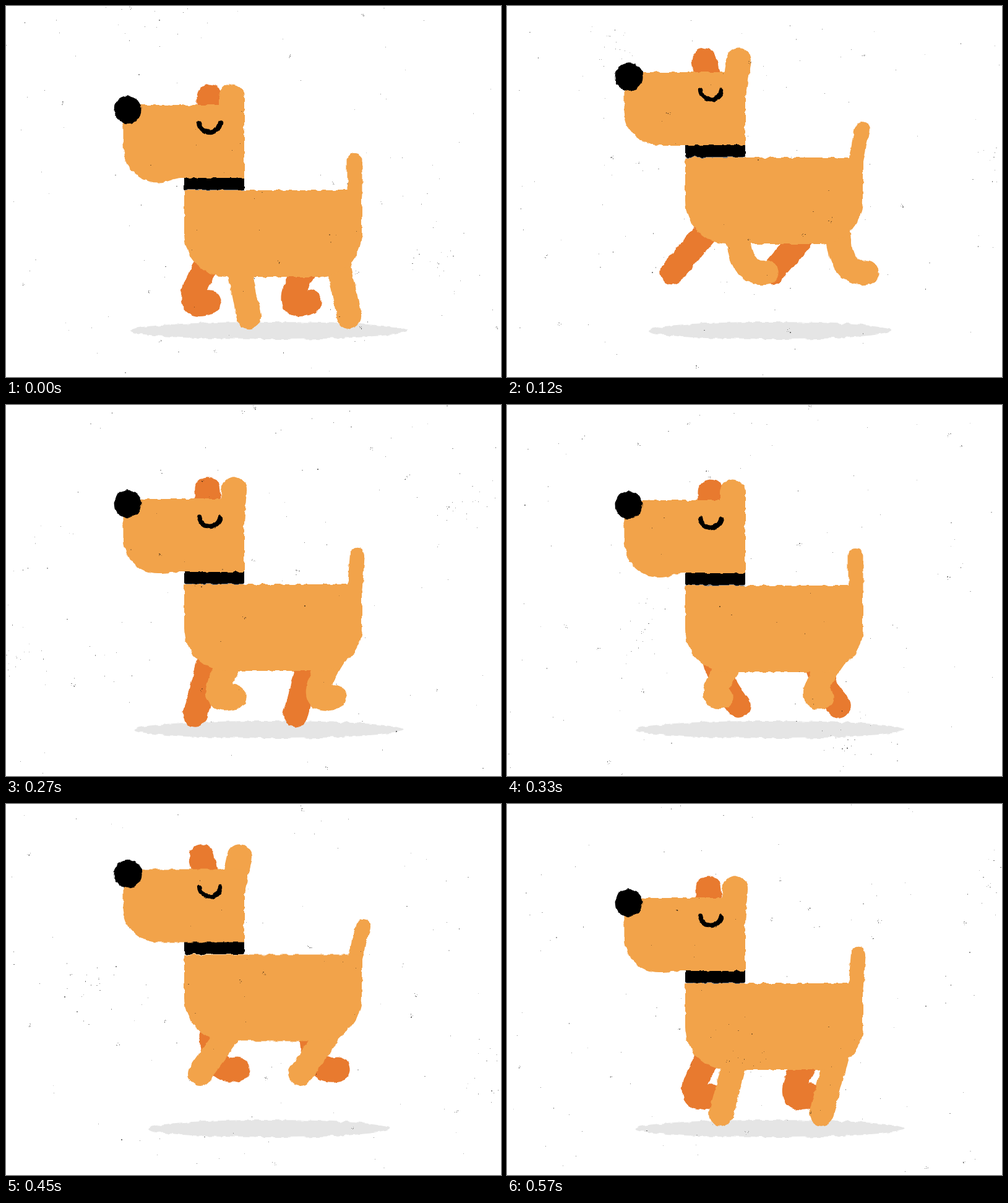
Write an HTML page with a canvas that moves like this. It is 800 by 600 pixels and loops after 600 ms.

```html
<!DOCTYPE html>
<html lang="en">
<head>
<meta charset="utf-8">
<title>Trotting dog</title>
<style>
  html, body { margin: 0; width: 100%; height: 100%; overflow: hidden; background: #fff; }
  canvas { position: absolute; left: 0; top: 0; }
  #dog { filter: url(#rough); }
  svg { position: absolute; width: 0; height: 0; }
</style>
</head>
<body>
<svg aria-hidden="true">
  <filter id="rough" x="0" y="0" width="100%" height="100%" color-interpolation-filters="sRGB">
    <feTurbulence type="fractalNoise" baseFrequency="0.09" numOctaves="2" seed="4" result="noise"/>
    <feDisplacementMap in="SourceGraphic" in2="noise" scale="6" xChannelSelector="R" yChannelSelector="G"/>
  </filter>
</svg>
<canvas id="dog" width="800" height="600"></canvas>
<canvas id="dust" width="800" height="600"></canvas>
<script>
const dog = document.getElementById('dog').getContext('2d');
const dust = document.getElementById('dust').getContext('2d');

const LOOP = 600, STEP = 30, BOUNCE = 300;
const LIGHT = '#f2a34a', DARK = '#e87a2f', BLACK = '#000', SHADOW = '#e5e5e5';
const HIP = { x: 373, y: 108 };
const REAR = 162, FAR = -40;

// time, back height, lean of ears and tail, jaw drop, shadow radius
const bodyKeys = [
  [0, 298, 0, 7.5, 224.5],
  [30, 292, 0, 7, 216.5],
  [90, 252, 4, 3.5, 200],
  [120, 245, 10, 0, 196.5],
  [150, 243.5, 13, 0, 195.5],
  [210, 260, 13, 0, 200],
  [270, 290, 4.2, 2, 217]
];

// time, knee x, knee y, foot x, foot y
const legKeys = [
  [0, 383, 156, 392.5, 204.5],
  [30, 380, 150, 414, 194],
  [90, 380, 184, 425, 183.5],
  [120, 373, 193, 419, 186],
  [210, 350, 195, 401, 184],
  [270, 314, 200, 369, 182],
  [300, 314, 200, 368, 181],
  [330, 318, 184, 346, 180],
  [390, 340, 147, 307, 186],
  [420, 340, 147, 307, 185.5],
  [510, 351, 158, 330, 208],
  [570, 360, 160, 346, 211]
];

// Smooth periodic interpolation through the keys
function sample(keys, time, period) {
  const t = time % period, n = keys.length;
  let i = n - 1;
  while (keys[i][0] > t) i--;
  const at = k => {
    const turn = Math.floor(k / n);
    const row = keys[k - turn * n];
    return [row[0] + turn * period, ...row.slice(1)];
  };
  const [a, b, c, d] = [at(i - 1), at(i), at(i + 1), at(i + 2)];
  const span = c[0] - b[0], u = (t - b[0]) / span, v = 1 - u;
  return b.slice(1).map((p, j) => {
    const k = j + 1;
    const m0 = (c[k] - a[k]) / (c[0] - a[0]) * span;
    const m1 = (d[k] - b[k]) / (d[0] - b[0]) * span;
    return p * (1 + 2 * u) * v * v + c[k] * u * u * (3 - 2 * u) + m0 * u * v * v - m1 * u * u * v;
  });
}

function stroke(color, width, trace) {
  dog.strokeStyle = color;
  dog.lineWidth = width;
  dog.lineCap = dog.lineJoin = 'round';
  dog.beginPath();
  trace();
  dog.stroke();
}

function fill(color, trace) {
  dog.fillStyle = color;
  dog.beginPath();
  trace();
  dog.fill();
}

function limb(color, width, x0, y0, x1, y1) {
  stroke(color, width, () => {
    dog.moveTo(x0, y0);
    dog.lineTo(x1, y1);
  });
}

function legs(color, time, shift) {
  const [kx, ky, fx, fy] = sample(legKeys, time, LOOP);
  for (const x of [shift, shift + REAR]) {
    stroke(color, 39.5, () => {
      dog.moveTo(HIP.x + x, HIP.y);
      dog.quadraticCurveTo(kx + x, ky, fx + x, fy);
    });
  }
}

function drawHead(lean, jaw) {
  const earY = -151 - lean * 0.52;
  limb(DARK, 41, 329, -100, 329 - lean, earY);
  limb(LIGHT, 41, 364.5, -100, 364.5 + lean, earY);
  fill(LIGHT, () => {
    dog.moveTo(189.5, -138);
    dog.lineTo(385, -138);
    dog.lineTo(385, -20);
    dog.lineTo(284, -20);
    dog.bezierCurveTo(272, -20, 262, jaw - 20, 246, jaw - 20);
    dog.bezierCurveTo(212, jaw - 20, 189.5, jaw - 46, 189.5, -76);
    dog.closePath();
  });
  fill(BLACK, () => dog.arc(197, -130.3, 22.5, 0, Math.PI * 2));
  stroke(BLACK, 7.5, () => {
    dog.moveTo(312.5, -109);
    dog.bezierCurveTo(316, -88.3, 343, -88.3, 346.5, -109);
  });
}

function drawDog(time) {
  const [top, lean, jaw, rx] = sample(bodyKeys, time, BOUNCE);
  dog.clearRect(0, 0, 800, 600);
  fill(SHADOW, () => dog.ellipse(424.7, 525, rx, 14, 0, 0, Math.PI * 2));
  dog.save();
  dog.translate(0, top);
  legs(DARK, time + LOOP / 2, FAR);
  legs(LIGHT, time, 0);
  limb(LIGHT, 24, 563.5, 9, 563.5 + lean * 1.04, -48 + lean * 0.2);
  fill(LIGHT, () => dog.roundRect(288, 0, 287, 140, [3, 2, 70, 70]));
  fill(BLACK, () => dog.roundRect(288, -23, 97, 22.5, 3));
  drawHead(lean, jaw);
  dog.restore();
}

function randomFrom(seed) {
  let s = seed;
  return () => {
    s = (s + 0x6D2B79F5) | 0;
    let r = Math.imul(s ^ (s >>> 15), 1 | s);
    r = (r + Math.imul(r ^ (r >>> 7), 61 | r)) ^ r;
    return ((r ^ (r >>> 14)) >>> 0) / 4294967296;
  };
}

function drawDust(seed) {
  const rnd = randomFrom(seed * 977 + 31);
  const speck = (x, y) => {
    dust.globalAlpha = 0.2 + rnd() * 0.35;
    dust.fillRect(Math.round(x), Math.round(y), rnd() < 0.2 ? 2 : 1, rnd() < 0.2 ? 2 : 1);
  };
  const cluster = (count, spread) => {
    const x = rnd() * 800, y = rnd() * 600;
    for (let i = 0; i < count; i++) {
      speck(x + (rnd() + rnd() - 1) * spread, y + (rnd() + rnd() - 1) * spread);
    }
  };
  dust.clearRect(0, 0, 800, 600);
  dust.fillStyle = '#000';
  for (let i = 0; i < 95; i++) speck(rnd() * 800, rnd() * 600);
  for (let i = 0; i < 14; i++) cluster(5, 4);
  for (let i = 0; i < 2; i++) cluster(18, 60);
}

let shown = -1;
function tick(now) {
  const step = Math.floor((now % LOOP) / STEP);
  if (step !== shown) {
    shown = step;
    drawDog(step * STEP);
    drawDust(Math.min(step, 18)); // the dust rests for the last step
  }
  requestAnimationFrame(tick);
}

const start = performance.now();
const run = () => tick(Math.max(0, performance.now() - start));
function tickLoop() {
  const step = Math.floor(((performance.now() - start) % LOOP) / STEP);
  return step;
}
requestAnimationFrame(tick);
</script>
</body>
</html>
```
